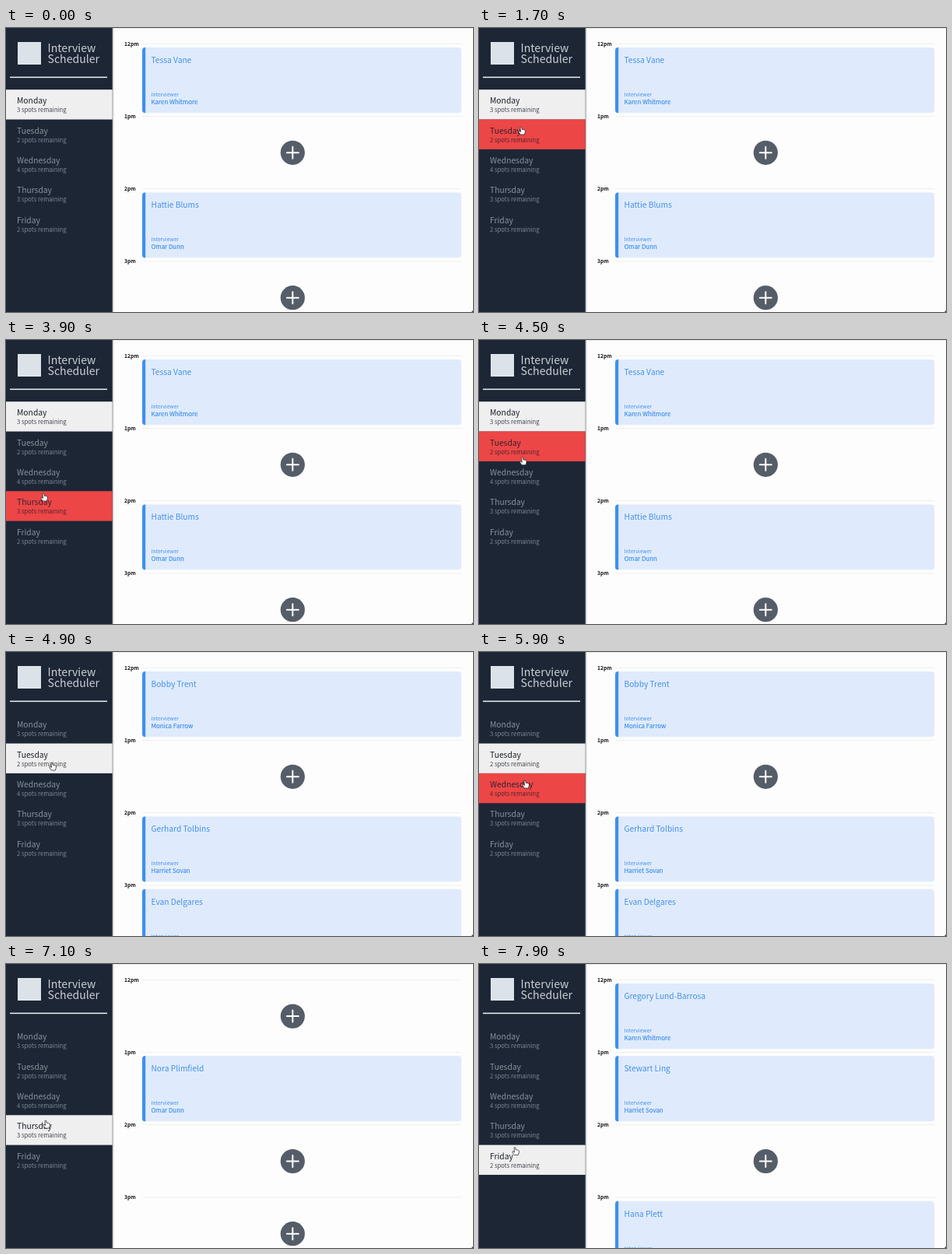
An HTML page for the animation above (8000 ms loop, 600 by 365 pixels).

```html
<!DOCTYPE html>
<html lang="en">
<head>
<meta charset="utf-8">
<title>Interview Scheduler</title>
<style>
  html, body { margin: 0; width: 100%; height: 100%; overflow: hidden; background: #fdfdfd; }
  svg { display: block; width: 600px; height: 365px; }
  text { font-family: "Noto Sans CJK JP", "Noto Sans CJK SC", "Noto Sans CJK KR", "Noto Sans CJK TC", "Noto Sans", sans-serif; }
  .title { font-size: 14.1px; font-weight: 300; fill: #ccd0d5; }
  .day { font-size: 10.3px; fill: #89919a; }
  .spots { font-size: 7.7px; font-weight: 300; fill: #7f8790; }
  .row rect { fill: none; }
  .hover rect { fill: #ed4647; }
  .hover .day { fill: #35232d; }
  .hover .spots { fill: #55242c; }
  .selected rect { fill: #efefef; }
  .selected .day { fill: #1b2029; }
  .selected .spots { fill: #41464e; }
  .time { font-size: 6.7px; font-weight: 700; fill: #111; }
  .card text { fill: #4490ec; }
  .guest { font-size: 10.2px; }
  .label { font-size: 6.65px; font-weight: 300; }
  .host { font-size: 7.9px; stroke: #4490ec; stroke-width: .18px; }
</style>
</head>
<body>
<svg id="stage" viewBox="0 0 600 365" xmlns="http://www.w3.org/2000/svg">
  <defs>
    <linearGradient id="shade">
      <stop offset="0" stop-color="#555c66" stop-opacity=".6"/>
      <stop offset="1" stop-color="#888" stop-opacity="0"/>
    </linearGradient>
    <clipPath id="cardShape"><rect width="410" height="84.3" rx="4"/></clipPath>
  </defs>
  <rect width="600" height="365" fill="#fdfdfd"/>
  <rect x="137" width="463" height="1" fill="#e8e8e8"/>
  <g id="schedule"></g>
  <rect x="136.5" width="2.5" height="365" fill="url(#shade)"/>
  <rect width="136.7" height="365" fill="#1d2635"/>
  <rect x="15" y="18" width="30" height="29" fill="#dce3e8"/>
  <text class="title" x="53.5" y="31">Interview</text>
  <text class="title" x="53.5" y="45">Scheduler</text>
  <rect x="5" y="62.6" width="125" height="1.5" fill="#eceef0"/>
  <g id="days"></g>
  <path d="M600 362.5V365H597.5Q599.5 364.5 600 362.5Z" fill="#333"/>
  <g id="pointer" stroke-linejoin="round">
    <path id="arrow" d="M0 0V9.2L2.2 7.2L3.7 10.4L5.2 9.7L3.8 6.7H6.7Z" fill="#111" stroke="#fff" stroke-width=".7"/>
    <path id="hand" d="M-1 .6Q0-.5 .9.6L1.3 3.4Q2.2 2.8 2.8 3.6Q3.8 3.1 4.3 4Q5.4 3.8 5.5 5L5.1 7.6L4.3 10H-.6L-2.9 6.8Q-3.6 5.3-2.4 5.2L-.5 6.5Z" fill="#fff" stroke="#222" stroke-width=".75"/>
  </g>
</svg>
<script>
const LOOP = 8000, STEP = 100;
const ROW_TOP = 79.2, ROW_HEIGHT = 38.35, SLOT_HEIGHT = 93.2;
const $ = id => document.getElementById(id);

// Each booking is [guest, interviewer]; null is a free slot.
const days = [
  { name: "Monday", spots: 3, slots: [["Tessa Vane", "Karen Whitmore"], null, ["Hattie Blums", "Omar Dunn"], null] },
  { name: "Tuesday", spots: 2, slots: [["Bobby Trent", "Monica Farrow"], null, ["Gerhard Tolbins", "Harriet Sovan"], ["Evan Delgares", "Monica Farrow"]] },
  { name: "Wednesday", spots: 4, slots: [null, null, null, null] },
  { name: "Thursday", spots: 3, slots: [null, ["Nora Plimfield", "Omar Dunn"], null, null] },
  { name: "Friday", spots: 2, slots: [["Gregory Lund-Barrosa", "Karen Whitmore"], ["Stewart Ling", "Harriet Sovan"], null, ["Hana Plett", "Omar Dunn"]] }
];
const clicks = [[0, 0], [4800, 1], [6200, 2], [7100, 3], [7800, 4]];

// Pointer tip: [time, x, y]
const path = [
  [500, 64, 14], [900, 64, 75], [1100, 64, 75], [1500, 56, 124], [1700, 54, 127],
  [2300, 50, 168], [2500, 49, 182], [2700, 48, 197], [3200, 46, 240], [3500, 46, 240],
  [3900, 48, 197], [4300, 52, 164], [4400, 54, 155], [4700, 59, 142], [5200, 59, 142],
  [5500, 64, 165], [5800, 64, 165], [6000, 54, 165], [6200, 56, 166], [6700, 51, 201],
  [7100, 51, 201], [7600, 46, 235.5], [8000, 46, 235.5]
];

const text = (cls, x, y, content) => `<text class="${cls}" x="${x}" y="${y}">${content}</text>`;

function card([guest, host], y) {
  return `<g class="card" transform="translate(175 ${y})">
    <g clip-path="url(#cardShape)"><rect width="410" height="84.3" fill="#dfebfc"/><rect width="4.2" height="84.3" fill="#408fec"/></g>
    ${text("guest", 11.5, 20, guest)}${text("label", 11.5, 63.2, "Interviewer")}${text("host", 11.5, 73, host)}</g>`;
}

function addButton(y) {
  return `<g transform="translate(368.3 ${y})"><circle r="15.6" fill="#555d69"/>
    <path d="M-7.5 0H7.5M0-7.5V7.5" stroke="#fff" stroke-width="2" stroke-linecap="round"/></g>`;
}

function slot(booking, i) {
  const y = 20.3 + i * SLOT_HEIGHT;
  return `<rect x="175" y="${y - .4}" width="410" height=".8" fill="#ececec"/>`
    + text("time", 152, y + 2.5, (i || 12) + "pm")
    + (booking ? card(booking, y + 4.6) : addButton(y + 46.8));
}

$("days").innerHTML = days.map(({ name, spots }, i) => {
  const y = ROW_TOP + i * ROW_HEIGHT;
  return `<g class="row"><rect y="${y}" width="136.7" height="${ROW_HEIGHT}"/>`
    + text("day", 14, y + 18, name) + text("spots", 14, y + 29, spots + " spots remaining") + "</g>";
}).join("");
const rows = [...$("days").children];

function pointerAt(t) {
  const next = path.findIndex(p => p[0] > t);
  if (next < 1) return null;
  const [t0, x0, y0] = path[next - 1], [t1, x1, y1] = path[next];
  const k = (t - t0) / (t1 - t0);
  return { x: x0 + (x1 - x0) * k, y: y0 + (y1 - y0) * k };
}

let shownDay = -1;
function render(t) {
  const selected = clicks.filter(c => c[0] <= t).pop()[1];
  if (selected !== shownDay) {
    $("schedule").innerHTML = days[selected].slots.map(slot).join("");
    shownDay = selected;
  }
  const tip = pointerAt(t);
  const hovered = tip ? Math.floor((tip.y - ROW_TOP) / ROW_HEIGHT) : -1;
  rows.forEach((row, i) => {
    row.setAttribute("class", "row" + (i === selected ? " selected" : i === hovered ? " hover" : ""));
  });
  $("pointer").style.display = tip ? "" : "none";
  if (!tip) return;
  $("pointer").setAttribute("transform", `translate(${tip.x} ${tip.y})`);
  $("arrow").style.display = hovered < 0 ? "" : "none";
  $("hand").style.display = hovered < 0 ? "none" : "";
}

const start = performance.now();
function tick() {
  const t = (performance.now() - start) % LOOP;
  render(Math.floor(t / STEP) * STEP);
  requestAnimationFrame(tick);
}
tick();
</script>
</body>
</html>
```
